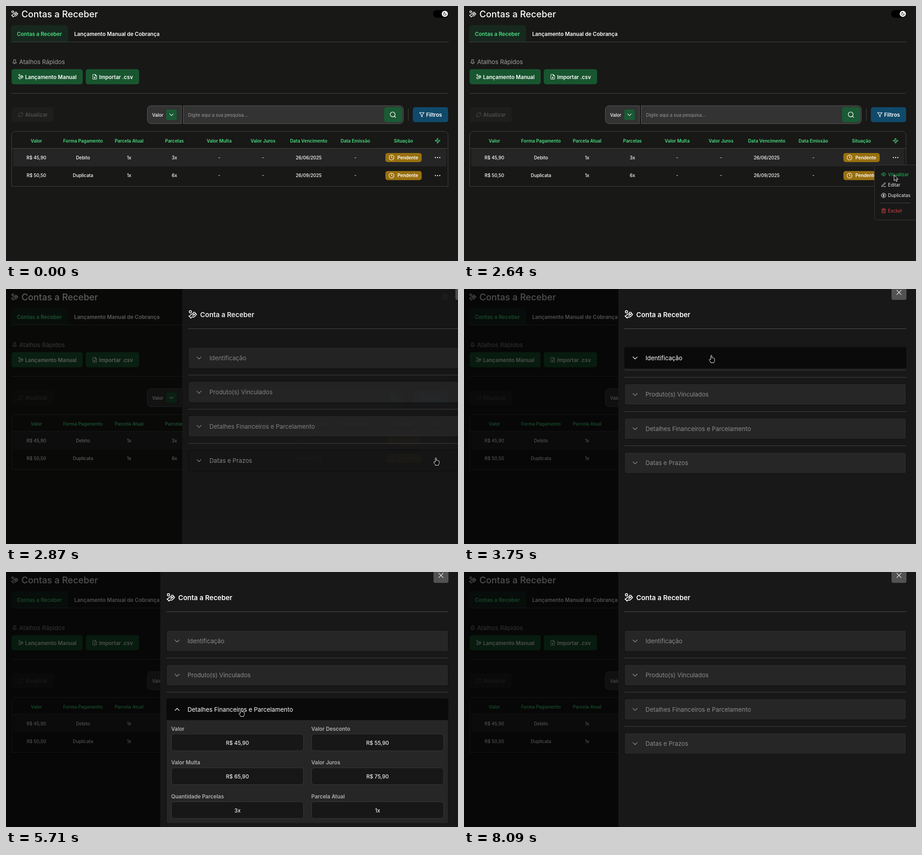
These frames come from a looping animation (996x562 px, 8630 ms). An HTML page:

```html
<!DOCTYPE html>
<html lang="pt-BR">
<head>
<meta charset="utf-8">
<title>Contas a Receber</title>
<style>
  html, body { margin: 0; width: 100%; height: 100%; overflow: hidden; background: #181817; }
  svg { display: block; }
  text { font-family: Inter, sans-serif; white-space: pre; }
  .icon { fill: none; stroke-linecap: round; stroke-linejoin: round; }
  .cursor { fill: #000; stroke: #fff; stroke-width: 1; stroke-linejoin: round; }
</style>
</head>
<body>
<svg id="stage" width="996" height="562" viewBox="0 0 996 562"></svg>
<script>
const LOOP = 8630;
const GREEN = '#4ade80', BUTTON = '#18562f', LINE = '#444';

const dot = (x, y, r) => `M${x - r} ${y}a${r} ${r} 0 1 0 ${2 * r} 0a${r} ${r} 0 1 0 ${-2 * r} 0`;
const ICONS = {
  coins: 'M11 15h2a2 2 0 1 0 0-4h-3c-.6 0-1.1.2-1.4.6L3 17M7 21l1.6-1.4c.3-.4.8-.6 1.4-.6h4c1.1 0 2.1-.4 2.8-1.2l4.6-4.4a2 2 0 0 0-2.75-2.91l-4.2 3.9M2 16l6 6' + dot(16, 9, 2.9) + dot(6, 5, 3),
  pin: 'M12 17v5M8 3h8v4h-1l1 5 3 2v3H5v-3l3-2 1-5H8z',
  file: 'M14 2H6a2 2 0 0 0-2 2v16a2 2 0 0 0 2 2h12a2 2 0 0 0 2-2V8zM14 2v6h6M12 18v-6M9 15l3 3 3-3',
  refresh: 'M3 12a9 9 0 0 1 9-9 9.75 9.75 0 0 1 6.74 2.74L21 8M21 3v5h-5M21 12a9 9 0 0 1-9 9 9.75 9.75 0 0 1-6.74-2.74L3 16M8 16H3v5',
  search: dot(11, 11, 8) + 'M21 21l-4.3-4.3',
  funnel: 'M22 3H2l8 9.46V19l4 2v-8.54z',
  chevron: 'M5 8.5l7 7 7-7',
  clock: dot(12, 12, 10) + 'M12 6v6l4 2',
  nodes: 'M10.2 6.3l-3.9 3.9M7 12h10M13.8 17.7l3.9-3.9' + dot(12, 4.5, 2.5) + dot(4.5, 12, 2.5) + dot(19.5, 12, 2.5) + dot(12, 19.5, 2.5),
  dots: dot(4, 12, 1) + dot(12, 12, 1) + dot(20, 12, 1),
  eye: 'M2 12c4-9 16-9 20 0-4 9-16 9-20 0z' + dot(12, 12, 3),
  pencil: 'M12 20h9M16.5 3.5a2.1 2.1 0 0 1 3 3L7 19l-4 1 1-4z',
  dollar: dot(12, 12, 10) + 'M16 8h-6a2 2 0 1 0 0 4h4a2 2 0 1 1 0 4H8M12 18V6',
  trash: 'M3 6h18M19 6v14a2 2 0 0 1-2 2H7a2 2 0 0 1-2-2V6M8 6V4a2 2 0 0 1 2-2h4a2 2 0 0 1 2 2v2M10 11v6M14 11v6',
  close: 'M3 3l18 18M21 3L3 21',
  moon: 'M12 3a6 6 0 0 0 9 9 9 9 0 1 1-9-9z'
};

// Text and icons are placed by their vertical centre.
const text = (x, y, s, size, weight = 400, fill = '#fff', anchor = 'start') =>
  `<text x="${x}" y="${y + size * .364}" font-size="${size}" font-weight="${weight}" fill="${fill}" text-anchor="${anchor}">${s}</text>`;
const icon = (name, cx, cy, size, color = '#fff', weight = 2) =>
  `<path class="icon" d="${ICONS[name]}" stroke="${color}" stroke-width="${weight}" transform="translate(${cx - size / 2} ${cy - size / 2}) scale(${size / 24})"/>`;
const rect = (x, y, w, h, r, fill, extra = '') =>
  `<rect x="${x}" y="${y}" width="${w}" height="${h}" rx="${r}" fill="${fill}" ${extra}/>`;
const shape = (d, fill, stroke = 'none') => `<path d="${d}" fill="${fill}" stroke="${stroke}"/>`;
const line = (x1, x2, y, color = LINE) => rect(x1, y - .5, x2 - x1, 1, 0, color);

const columns = [
  ['Valor', 67], ['Forma Pagamento', 169.7], ['Parcela Atual', 271.3], ['Parcelas', 371.2], ['Valor Multa', 469.7],
  ['Valor Juros', 566.3], ['Data Vencimento', 667], ['Data Emissão', 769.8], ['Situação', 875.7]
];
const rows = [
  ['R$ 45,90', 'Debito', '1x', '3x', '-', '-', '26/06/2025', '-'],
  ['R$ 50,50', 'Duplicata', '1x', '6x', '-', '-', '26/09/2025', '-']
];

const tableRow = (cells, i) => {
  const y = 334 + i * 39.8;
  return cells.map((s, c) => text(columns[c][1], y, s, 9.96, 500, '#fff', 'middle')).join('') +
    rect(836, y - 10, 80, 20, 5, '#98700f') + icon('clock', 849.5, y, 13) +
    text(862.5, y, 'Pendente', 9.96, 600) +
    (i ? '' : rect(939.5, 322, 24, 24, 5, '#414141', 'id="dotsHover"')) +
    icon('dots', 951, y, 14.5, '#fff', 2.2);
};

const page = () =>
  icon('coins', 19, 17.5, 16.6) + text(34, 18, 'Contas a Receber', 19.92, 500) +
  rect(941, 9, 34, 17, 8.5, '#000') + `<circle cx="967" cy="17.3" r="6.8" fill="#fff"/>` + icon('moon', 967, 17.3, 9, '#000', 2.4) +
  shape('M11 79V50a8 8 0 0 1 8-8h110a8 8 0 0 1 8 8v29z', '#17291f') + line(11, 976, 79.3) +
  text(24, 61.5, 'Contas a Receber', 11.62, 600, GREEN) + text(150.3, 61.5, 'Lançamento Manual de Cobrança', 11.62, 600) +
  icon('pin', 19, 123, 12.5, '#a0a0a0') + text(29, 123, 'Atalhos Rápidos', 13.28, 400, '#a0a0a0') +
  rect(12.3, 139.2, 156.7, 33.2, 5, BUTTON) + icon('coins', 32.5, 156, 12.5) + text(42, 156.5, 'Lançamento Manual', 11.62, 600) +
  rect(175.8, 139.2, 117.5, 33.2, 5, BUTTON) + icon('file', 195.5, 156, 12.5) + text(205, 156.5, 'Importar .csv', 11.62, 600) +
  line(12, 974, 192.5) +
  rect(12.3, 223, 92.7, 33, 5, '#1e1f1d') + icon('refresh', 32.3, 239.7, 12, '#4d4d4c') + text(42, 240, 'Atualizar', 11.62, 600, '#4d4d4c') +
  shape('M386.5 219.8H319.5a8 8 0 0 0-8 8v23.5a8 8 0 0 0 8 8h67z', '#333', '#5a5a5a') +
  text(322, 240, 'Valor', 9.96, 500) + rect(353, 228, 23.3, 23.3, 4, '#1a5a34') + icon('chevron', 364.6, 239.7, 13) +
  shape('M390.5 219.8h477a8 8 0 0 1 8 8v23.5a8 8 0 0 1-8 8h-477z', '#333', '#5a5a5a') +
  text(401, 240, 'Digite aqui a sua pesquisa...', 9.96, 400, '#989898') +
  rect(833, 222.8, 40, 33.5, 6, '#1a5a34') + icon('search', 852.7, 239.6, 16) +
  rect(886, 226, 1, 27, 0, LINE) +
  rect(896.5, 223, 77.7, 33, 5, '#104a6b') + icon('funnel', 916.3, 239.6, 12.5) + text(925.7, 240, 'Filtros', 11.62, 600) +
  rect(16, 314, 954.5, 39.5, 0, '#252525') +
  shape('M12.5 397.5V284.5a8 8 0 0 1 8-8H966a8 8 0 0 1 8 8v113z', 'none', LINE) + line(13, 974, 313.8) +
  columns.map(([s, x]) => text(x, 297, s, 9.96, 600, GREEN, 'middle')).join('') +
  icon('nodes', 951, 297, 12.5, GREEN) + rows.map(tableRow).join('');

const menuItem = (name, s, y, color = '#f0f0f0') => icon(name, 924.7, y, 12, color) + text(934.3, y, s, 9.96, 400, color);
const menu = () =>
  rect(904.5, 350.5, 110, 121, 6, '#181818', 'stroke="#3a3a3a"') +
  menuItem('eye', 'Visualizar', 371, '#22c55e') + menuItem('pencil', 'Editar', 394) +
  menuItem('dollar', 'Duplicatas', 417.5) + line(918, 984, 434) + menuItem('trash', 'Excluir', 451.3, '#ef4444');

const ROW = 74.6, STEP = 75.4, HEADER = 47.5;
const sections = [
  { title: 'Identificação', opens: 3750, closes: 4280, fields: [
    ['Código', '1'], ['Tipo', 'Receita'], ['Cliente', 'Consumidor'], ['Documento', '-'], ['Origem', 'Manual'],
    ['Categoria', 'Vendas'], ['Forma Pagamento', 'Debito'], ['Situação', 'Pendente'], ['Descrição', '-'], ['Observação', '-']] },
  { title: 'Produto(s) Vinculados', fields: [] },
  { title: 'Detalhes Financeiros e Parcelamento', opens: 5430, closes: 7800, fields: [
    ['Valor', 'R$ 45,90'], ['Valor Desconto', 'R$ 55,90'], ['Valor Multa', 'R$ 65,90'],
    ['Valor Juros', 'R$ 75,90'], ['Quantidade Parcelas', '3x'], ['Parcela Atual', '1x']] },
  { title: 'Datas e Prazos', fields: [] }
];
sections.forEach(s => s.height = s.fields.length / 2 * ROW + 4);

const field = ([label, value], i) => {
  const x = i % 2 ? 672.8 : 364, y = HEADER + (i >> 1) * ROW;
  return text(x, y + 19.3, label, 11.62, 600, '#b0b0b0') +
    rect(x + .5, y + 30.7, 291, 37, 6, '#171717', 'stroke="#3a3a3a"') +
    text(x + 146, y + 50, value, 11.62, 500, '#eee', 'middle');
};

const section = (s, i) => `<g class="section">
  <clipPath id="clip${i}"><rect x="353" y="${HEADER}" width="622" height="0"/></clipPath>
  <g clip-path="url(#clip${i})">${rect(353.5, HEADER - 4, 621, s.height + 4, 4, '#262626', 'stroke="#101010"')}${s.fields.map(field).join('')}</g>
  ${rect(353.5, .3, 621, HEADER - .6, 4, '#262626', 'class="head" stroke="#0e0e0e"')}
  <g class="arrow">${icon('chevron', 377, 24, 16, 'currentColor')}</g>
  ${text(400, 24, s.title, 13.28, 400, 'currentColor')}
  ${i < 3 ? `<g class="rule">${line(353, 975, 61.6)}</g>` : ''}</g>`;

const drawer = () =>
  rect(340, 0, 656, 562, 0, '#181818') +
  rect(942, -9, 33, 33, 4, '#525252') + icon('close', 958.5, 7.5, 13) +
  icon('coins', 363, 56, 20) + text(379.5, 56.3, 'Conta a Receber', 14.94, 600) +
  line(353, 975, 87.5, '#505050') + sections.map(section).join('');

const stage = document.getElementById('stage');
stage.innerHTML = rect(0, 0, 996, 562, 0, '#181817') + page() +
  `<g id="menu">${menu()}</g>` +
  rect(0, 0, 996, 562, 0, '#000', 'id="shade"') +
  `<g id="drawer">${drawer()}</g>
  <g id="pointer" class="cursor">
    <path id="arrow" d="M.5.5v12.6l2.9-2.7 2 4.4 2-.9-2-4.3h4z"/>
    <path id="hand" d="M-1.2 9.5V1.4a1.2 1.2 0 0 1 2.4 0V6a1.1 1.1 0 0 1 2.1.4 1.1 1.1 0 0 1 2 .5 1 1 0 0 1 1.8.6v4.2q0 2.2-1.4 3.5v1.3H-1.2v-1.2L-4.6 10.600q-.4-1.700 1-1.800z"/>
  </g>`;

const $ = id => document.getElementById(id);
const parts = [...document.querySelectorAll('.section')].map((g, i) => ({
  g, head: g.querySelector('.head'), arrow: g.querySelector('.arrow'), rule: g.querySelector('.rule'),
  clip: $('clip' + i).firstElementChild
}));

const clamp = u => Math.max(0, Math.min(1, u));
const ramp = (t, start, length) => clamp((t - start) / length);
const easeInOut = u => u < .5 ? 4 * u ** 3 : 1 - 4 * (1 - u) ** 3;
const easeOut = u => 1 - (1 - u) ** 3;
const smooth = u => u * u * (3 - 2 * u);
const mix = (a, b, u) => a + (b - a) * u;

const path = [
  [230, 815, 570], [900, 955, 331], [1200, 955, 331], [1820, 926, 366], [1970, 926, 366], [2560, 947.3, 372],
  [2930, 947.3, 372], [3600, 545, 146], [4400, 545, 146], [4760, 525.3, 260.5], [5080, 518, 302], [6220, 518, 302],
  [6570, 929.5, 536], [7060, 929.5, 536], [7120, 937.3, 550], [7520, 755, 286], [7840, 755, 286], [8070, 1002, 566]
];
function pointerAt(t) {
  const i = path.findIndex(k => k[0] > t);
  if (i < 1) return path[i ? path.length - 1 : 0].slice(1);
  const [a, b] = [path[i - 1], path[i]], u = smooth((t - a[0]) / (b[0] - a[0]));
  return [mix(a[1], b[1], u), mix(a[2], b[2], u)];
}

const show = (el, on) => el.setAttribute('visibility', on ? 'visible' : 'hidden');
const inside = ([x, y], left, top, w, h) => x >= left && x <= left + w && y >= top && y <= top + h;

function render(t) {
  const pos = pointerAt(t), trail = pointerAt(t - 80);
  const slide = easeInOut(ramp(t, 2687, 250));
  const onDots = t < 1130 && inside(pos, 939, 322, 25, 24);
  let pointing = onDots;

  show($('dotsHover'), onDots);
  $('menu').setAttribute('opacity', ramp(t, 1130, 100) - ramp(t, 2670, 100));
  $('shade').setAttribute('opacity', .69 * slide);
  $('drawer').setAttribute('opacity', slide);
  $('drawer').setAttribute('transform', `translate(${656 * (1 - slide)} 0)`);

  let top = 128;
  sections.forEach((s, i) => {
    const p = parts[i];
    const open = s.opens ? easeOut(ramp(t, s.opens, 220)) - easeOut(ramp(t, s.closes, 220)) : 0;
    const active = s.opens && t >= s.opens && t < s.closes;
    const hover = t > 2780 && inside(trail, 353, top, 622, HEADER);
    pointing ||= t > 2780 && inside(pos, 353, top, 622, HEADER);
    p.g.setAttribute('transform', `translate(0 ${top})`);
    p.g.setAttribute('color', active ? '#fff' : '#8c8c8c');
    p.head.setAttribute('fill', active ? '#0a0a0a' : hover ? '#171717' : '#262626');
    p.arrow.setAttribute('transform', `rotate(${180 * open} 377 24)`);
    p.clip.setAttribute('height', s.height * open);
    p.rule?.setAttribute('transform', `translate(0 ${s.height * open})`);
    top += STEP + s.height * open;
  });

  $('pointer').setAttribute('transform', `translate(${pos[0]} ${pos[1]})`);
  show($('hand'), pointing);
  show($('arrow'), !pointing);
}

const begin = performance.now();
function tick() {
  render((performance.now() - begin) % LOOP);
  requestAnimationFrame(tick);
}
tick();
</script>
</body>
</html>
```
